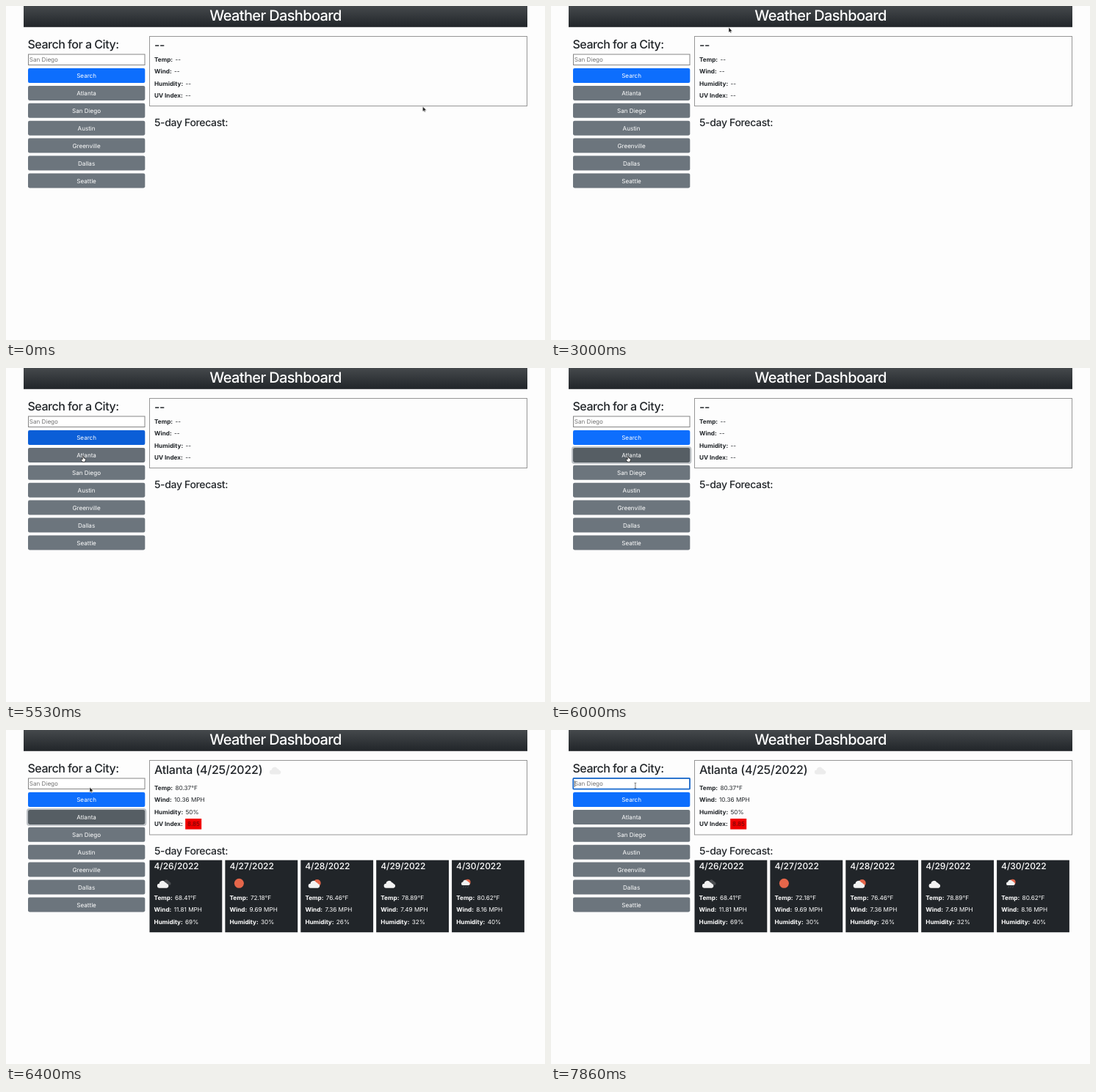
An HTML page for the animation above (8 s loop, 734 by 456 pixels).

```html
<!DOCTYPE html>
<html lang="en">
<head>
<meta charset="utf-8">
<title>Weather Dashboard</title>
<style>
  html, body { margin: 0; width: 100%; height: 100%; overflow: hidden; background: #fdfdfd; }
  svg { display: block; width: 734px; height: 456px; }
  text { font: 400 8.2px Inter, "Liberation Sans", sans-serif; fill: #212529; text-rendering: geometricPrecision; }
  .b { font-weight: 700; }
  .h1, .h2, .h3, .h4 { font-weight: 500; }
  .h1 { font-size: 20px; letter-spacing: -.032em; fill: #fff; }
  .h2 { font-size: 16px; letter-spacing: -.03em; }
  .h3 { font-size: 14px; letter-spacing: -.025em; }
  .h4 { font-size: 12px; letter-spacing: -.005em; }
  .city { letter-spacing: -.014em; }
  .mid { text-anchor: middle; }
  .btn text { font-size: 8.1px; fill: #fff; text-anchor: middle; }
  .btn rect { fill: #6c757d; }
  .cards text { fill: #fff; }
  .box { fill: none; stroke: #969696; }

  .step { animation: 8s step-end infinite; }
  .fade { animation: 8s linear infinite; }
  #search rect { fill: #0d6efd; animation-name: search; }
  #b0 rect { animation-name: pick; }
  #ring { animation-name: ring; }
  #before { animation-name: before; }
  #after { animation-name: after; }
  #focus { animation-name: focus; }
  #caret { animation-name: caret; }
  #pointer { animation-name: move; }
  #arrow { animation-name: arrow; }
  #hand { animation-name: hand; }
  #beam { animation-name: beam; }

  @keyframes search {
    0%, 62.5%, 71.5%, 78.25%, 80%, 100% { fill: #0d6efd; }
    63.5%, 69.2% { fill: #0b5ed7; }
    79.125% { fill: #0d66ea; }
  }
  @keyframes pick {
    0%, 68% { fill: #6c757d; }
    69.125% { fill: #666e76; }
    70.5% { fill: #5c636a; }
    72%, 84.2% { fill: #565e64; }
    86%, 100% { fill: #6c757d; }
  }
  @keyframes ring {
    0%, 71%, 85.5%, 100% { opacity: 0; }
    72%, 84.2% { opacity: 1; }
  }
  @keyframes before { 0% { opacity: 1; } 80%, 100% { opacity: 0; } }
  @keyframes after { 0% { opacity: 0; } 80%, 100% { opacity: 1; } }
  @keyframes focus { 0% { opacity: 0; } 84.125%, 100% { opacity: 1; } }
  @keyframes caret {
    0%, 92.5% { opacity: 0; }
    84.125%, 98.25%, 100% { opacity: 1; }
  }
  @keyframes move {
    0% { transform: translate(567.5px, 137px); }
    3.25% { transform: translate(546px, 99px); }
    11.625% { transform: translate(444px, 92px); }
    24.125% { transform: translate(374px, 77px); }
    37.5% { transform: translate(242px, 29px); }
    53.25% { transform: translate(73.5px, -2px); }
    58.25% { transform: translate(99px, 73px); }
    62.5% { transform: translate(102px, 92px); }
    63.375% { transform: translate(104px, 109px); }
    64.125% { transform: translate(105px, 120px); }
    77.5% { transform: translate(108px, 109px); }
    78.25% { transform: translate(112px, 93px); }
    79.125% { transform: translate(113.5px, 81.5px); }
    80% { transform: translate(114px, 78px); }
    80.75%, 100% { transform: translate(114.8px, 76px); }
  }
  @keyframes arrow {
    0%, 79.125% { opacity: 1; }
    58.25%, 80.75%, 100% { opacity: 0; }
  }
  @keyframes hand {
    0%, 79.125%, 100% { opacity: 0; }
    62.5% { opacity: 1; }
  }
  @keyframes beam {
    0%, 62.5% { opacity: 0; }
    58.25%, 80.75%, 100% { opacity: 1; }
  }
</style>
</head>
<body>
<svg viewBox="0 0 734 456">
  <defs>
    <linearGradient id="bar" x2="0" y2="1">
      <stop stop-color="#45494c"/>
      <stop offset="1" stop-color="#212529"/>
    </linearGradient>
    <path id="cloud" d="M3 11a3 3 0 0 1-.2-6A4.2 4.2 0 0 1 10.600 3.200 3.400 3.400 0 0 1 13.200 5.400 2.850 2.850 0 0 1 13 11Z"/>
  </defs>

  <rect x="24" width="686" height="28.800" fill="url(#bar)"/>
  <text class="h1 mid" x="367" y="20">Weather Dashboard</text>

  <text class="h2" x="29.500" y="57.500">Search for a City:</text>
  <rect x="30.500" y="66" width="158.500" height="14.500" fill="#fff" stroke="#858585"/>
  <text x="31.800" y="76.200" style="font-size:8.1px;fill:#757575">San Diego</text>
  <g id="focus" class="step">
    <rect x="30.200" y="65.900" width="158.800" height="14.800" rx="1" fill="none" stroke="#1769cf" stroke-width="1.700"/>
    <path id="caret" class="step" d="M32.300 69v9" stroke="#222" stroke-width=".7"/>
  </g>

  <rect id="ring" class="fade" x="29" y="108" width="161.300" height="22" rx="3" fill="none" stroke="#828a91" stroke-opacity=".5" stroke-width="2.100"/>
  <g id="buttons"></g>

  <g id="before" class="step">
    <rect class="box" x="195.500" y="41.500" width="514" height="95"/>
    <text class="h2" x="202" y="59">--</text>
    <g id="blank"></g>
    <text class="h3" x="202" y="163.700">5-day Forecast:</text>
  </g>

  <g id="after" class="step">
    <rect class="box" x="195.500" y="41.500" width="514" height="101.500"/>
    <text class="h2 city" x="202" y="59.500">Atlanta (4/25/2022)</text>
    <use href="#cloud" x="359" y="49.500" fill="#ececec"/>
    <rect x="244.200" y="121" width="22" height="14.600" fill="#f00000"/>
    <g id="today"></g>
    <text x="247" y="131.300" style="fill:#6a0808">8.85</text>
    <text class="h3" x="202" y="169.700">5-day Forecast:</text>
    <g id="cards" class="cards"></g>
  </g>

  <g id="pointer" class="step">
    <path id="arrow" class="step" d="M0 0V7.200L1.600 5.800 2.600 8.100 3.700 7.600 2.700 5.400H4.900Z" fill="#111" stroke="#fff" stroke-width=".5"/>
    <path id="hand" class="step" d="M-.8 .6Q0-.5 .8 .6V3L3 3.600Q3.700 4 3.400 5.500L2.600 8.200H-1L-2.900 5Q-2.600 4-1.600 4.500L-.8 5Z" fill="#fff" stroke="#111" stroke-width=".7"/>
    <path id="beam" class="step" d="M-1.300-3.800Q0-3.800 0-3Q0-3.800 1.300-3.800M0-3V3M-1.300 3.800Q0 3.800 0 3Q0 3.800 1.300 3.800" fill="none" stroke="#333" stroke-width=".7"/>
  </g>
</svg>
<script>
  const put = (id, html) => { document.getElementById(id).innerHTML = html; };
  const labels = ['Temp', 'Wind', 'Humidity', 'UV Index'];

  const rows = (x, y, values) => values.map((v, i) =>
    `<text x="${x}" y="${y + i * 16.6}"><tspan class="b">${labels[i]}:</tspan> <tspan dx="1">${v}</tspan></text>`
  ).join('');

  const button = (name, i) =>
    `<g class="btn" id="${i ? 'b' + (i - 1) : 'search'}">
      <rect class="${i < 2 ? 'fade' : ''}" x="30" y="${85 + i * 23.9}" width="159.300" height="20" rx="2.100"/>
      <text x="109.600" y="${98.100 + i * 23.9}">${name}</text>
    </g>`;

  const cloud = (x, y, fill = '#f2f2f2', scale = 1) =>
    `<use href="#cloud" transform="translate(${x} ${y}) scale(${scale})" fill="${fill}"/>`;
  const sun = (x, y, r) => `<circle cx="${x}" cy="${y}" r="${r}" fill="#e5664a"/>`;

  // Icon positions are relative to the card's left edge.
  const icons = [
    cloud(17.5, 203.5, '#4a4d50', .75) + cloud(10.500, 204.700),
    sun(19, 209.300, 6.500),
    sun(22.400, 209, 5) + cloud(10.500, 204.700),
    cloud(10.500, 204.700),
    sun(21.500, 207.700, 4) + cloud(13, 203.800, '#f2f2f2', .75) +
      '<path d="M16.500 213l-1 2.500M19.500 213l-1 2.500M22.500 213l-1 2.500" stroke="#4a4d50"/>'
  ];

  const days = [
    [68.41, 11.81, 69], [72.18, 9.69, 30], [76.46, 7.36, 26],
    [78.89, 7.49, 32], [80.62, 8.16, 40]
  ];

  const card = ([temp, wind, humidity], i) =>
    `<g transform="translate(${195.5 + i * 102.9} 0)">
      <rect y="177.700" width="98.800" height="98.500" fill="#212529"/>
      <text class="h4" x="6" y="189.700">4/${26 + i}/2022</text>
      ${icons[i]}
      ${rows(6.1, 231.6, [temp + '°F', wind + ' MPH', humidity + '%'])}
    </g>`;

  put('buttons', ['Search', 'Atlanta', 'San Diego', 'Austin', 'Greenville', 'Dallas', 'Seattle'].map(button).join(''));
  put('blank', rows(202, 75.5, ['--', '--', '--', '--']));
  put('today', rows(202, 81.5, ['80.37°F', '10.36 MPH', '50%', '']));
  put('cards', days.map(card).join(''));
</script>
</body>
</html>
```
